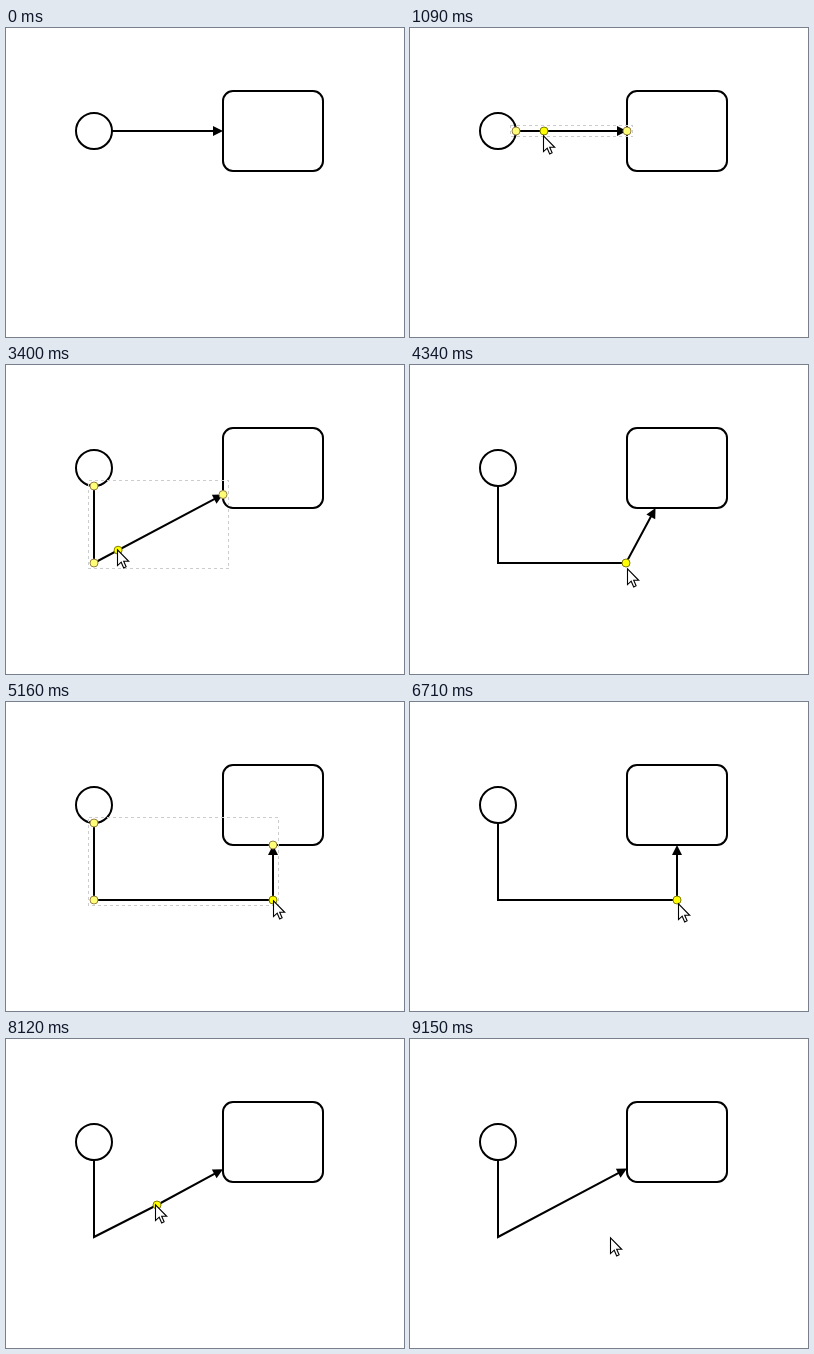
These frames come from a looping animation (398x309 px, 9.73 s). An HTML page:

```html
<!DOCTYPE html>
<html lang="en">
<head>
<meta charset="utf-8">
<title>Bending a connection</title>
<style>
  html, body { margin: 0; width: 100%; height: 100%; overflow: hidden; background: #fff; }
  svg { display: block; width: 398px; height: 309px; }
  .shape { fill: #fff; stroke: #000; stroke-width: 2; }
  #flow { fill: none; stroke: #000; stroke-width: 2; }
  #outline { fill: none; stroke: #ccc; stroke-dasharray: 3 3; shape-rendering: crispEdges; }
  .handle { fill: #ff7; stroke: #997f45; }
  .handle.active { fill: #ff0; stroke: #807d00; }
  #cursor { fill: #fff; stroke: #000; stroke-width: 1.1; }
</style>
</head>
<body>
<svg viewBox="0 0 398 309">
  <circle class="shape" cx="88" cy="103" r="18"/>
  <rect class="shape" x="217" y="63" width="100" height="80" rx="10"/>
  <polyline id="flow"/>
  <path id="arrow" d="M0 0L-10 -5V5Z"/>
  <rect id="outline"/>
  <g id="handles"></g>
  <path id="cursor" d="M.5 .8V16.6L4.2 13.2L6.7 18.9L9.1 17.8L6.7 12.3H11.7Z"/>
</svg>
<script>
const LOOP = 9730;
const START = [88, 103], TASK = [267, 103], CORNER = [88, 198];
const HOVERS = [[1050, 2140], [3140, 4100], [4950, 5330], [8990, 9150]];
const DRAGS = [[2140, 3140], [4100, 4950], [5330, 8690]];

const ease = {
  lin: p => p,
  in: p => p * p,
  out: p => p * (2 - p),
  both: p => p * p * (3 - 2 * p)
};

// Each key: time, x, y, easing on the way there
const cursorKeys = [
  [80, 170, 223], [640, 170, 223], [1090, 133, 107, 'both'], [1330, 133, 103, 'out'],
  [2100, 133, 103], [2500, 105, 183, 'both'], [2960, 87, 196, 'out'],
  [3100, 87, 196], [3840, 153, 163, 'both'],
  [4060, 153, 163], [4340, 217, 203, 'in'], [4780, 266, 204, 'out'],
  [4910, 266, 204], [5330, 267, 194, 'both'], [5450, 267, 194], [5530, 268, 202],
  [6670, 268, 202], [6710, 268, 201], [6790, 268, 199],
  [6960, 268, 199], [7600, 160, 184, 'both'], [7960, 148, 172, 'out'],
  [8200, 150, 162, 'both'], [8950, 150, 162], [9150, 200, 198, 'both']
];
const bendKeys = [
  [2100, 134, 103], [2500, 107, 182, 'both'], [2960, 88, 198, 'out'],
  [4059, 88, 198], [4060, 154, 163], [4340, 216, 198, 'in'], [4780, 267, 198, 'out'],
  [6960, 267, 198], [7600, 163, 185, 'both'], [7960, 150, 173, 'out'],
  [8200, 152, 163, 'both']
];

const $ = id => document.getElementById(id);
const set = (el, attrs) => { for (const k in attrs) el.setAttribute(k, attrs[k]); };
const within = (spans, t) => spans.some(([a, b]) => t >= a && t < b);
const dist = (a, b) => Math.hypot(a[0] - b[0], a[1] - b[1]);
const mix = (a, b, p) => [a[0] + (b[0] - a[0]) * p, a[1] + (b[1] - a[1]) * p];

function sample(keys, t) {
  const i = keys.findIndex(k => k[0] > t);
  if (i === 0) return keys[0].slice(1, 3);
  if (i < 0) return keys[keys.length - 1].slice(1, 3);
  const a = keys[i - 1], b = keys[i];
  const p = ease[b[3] || 'lin']((t - a[0]) / (b[0] - a[0]));
  return mix(a.slice(1, 3), b.slice(1, 3), p).map(Math.round);
}

const dockCircle = to => mix(START, to, 18 / dist(START, to));

// The task border counts as a box with cut corners
function dockTask(from) {
  const dx = Math.abs(from[0] - TASK[0]), dy = Math.abs(from[1] - TASK[1]);
  return mix(TASK, from, 1 / Math.max(dx / 50, dy / 40, (dx + dy) / 80));
}

function route(t) {
  const bend = sample(bendKeys, t);
  const bends = t < 2140 ? [] : t < 4100 ? [bend] : t < 8690 ? [CORNER, bend] : [CORNER];
  const first = bends[0] || TASK, last = bends[bends.length - 1] || START;
  return [dockCircle(first), ...bends, dockTask(last)];
}

function nearest(points, p) {
  let best = points[0];
  for (let i = 1; i < points.length; i++) {
    const a = points[i - 1], b = points[i], len = dist(a, b) || 1;
    const dot = (p[0] - a[0]) * (b[0] - a[0]) + (p[1] - a[1]) * (b[1] - a[1]);
    const q = mix(a, b, Math.min(1, Math.max(0, dot / (len * len))));
    if (dist(q, p) < dist(best, p)) best = q;
  }
  return best;
}

const handles = Array.from({ length: 5 }, () => {
  const c = document.createElementNS('http://www.w3.org/2000/svg', 'circle');
  c.setAttribute('r', 4);
  return $('handles').appendChild(c);
});

function showHandles(list) {
  handles.forEach((c, i) => {
    const h = list[i];
    c.style.display = h ? '' : 'none';
    if (h) set(c, { cx: h.at[0], cy: h.at[1], class: h.active ? 'handle active' : 'handle' });
  });
}

function hoverHandles(points, pointer) {
  const spot = nearest(points, pointer);
  const list = points.map(at => ({ at, active: dist(at, spot) < 7 }));
  if (!list.some(h => h.active)) list.push({ at: spot, active: true });
  return list;
}

function draw(t) {
  const points = route(t), tip = points[points.length - 1], prev = points[points.length - 2];
  const angle = Math.atan2(tip[1] - prev[1], tip[0] - prev[0]);
  // Stop the line inside the arrowhead so its point stays sharp
  const end = mix(tip, prev, 4 / dist(tip, prev));
  set($('flow'), { points: [...points.slice(0, -1), end].join(' ') });
  set($('arrow'), { transform: `translate(${tip}) rotate(${angle * 180 / Math.PI})` });

  const cursor = sample(cursorKeys, t);
  set($('cursor'), { transform: `translate(${cursor})` });
  $('cursor').style.display = t < 80 ? 'none' : '';

  const hover = within(HOVERS, t);
  $('outline').style.display = hover ? '' : 'none';
  if (hover) {
    const xs = points.map(p => Math.round(p[0])), ys = points.map(p => Math.round(p[1]));
    const x = Math.min(...xs), y = Math.min(...ys);
    set($('outline'), {
      x: x - 5.5, y: y - 5.5,
      width: Math.max(...xs) - x + 11, height: Math.max(...ys) - y + 11
    });
    showHandles(hoverHandles(points, [cursor[0] + 1, cursor[1] + 1]));
  } else {
    showHandles(within(DRAGS, t) ? [{ at: prev, active: true }] : []);
  }
}

const began = performance.now();
function frame() {
  draw((performance.now() - began) % LOOP);
  requestAnimationFrame(frame);
}
frame();
</script>
</body>
</html>
```
